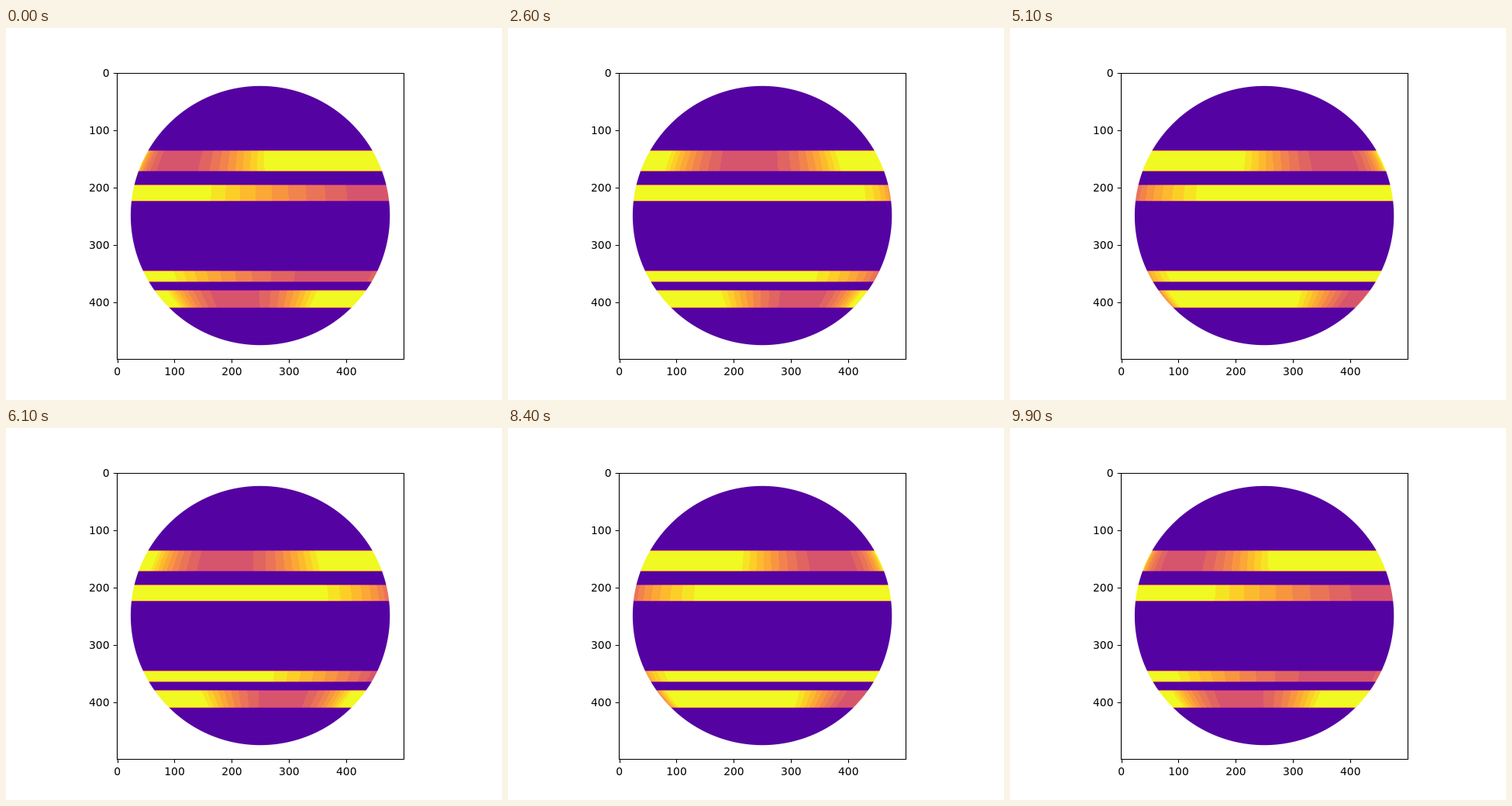
An HTML page with a canvas that plays this animation: 640 by 480 pixels, repeating every 10 s.

```html
<!DOCTYPE html>
<html lang="en">
<head>
<meta charset="utf-8">
<title>Rotating banded planet</title>
<style>
  html, body { margin: 0; width: 640px; height: 480px; overflow: hidden; background: #fff; }
  canvas, svg { position: absolute; left: 0; top: 0; }
  text { font: 13.89px "DejaVu Sans", sans-serif; }
  path { fill: none; stroke: #000; stroke-width: 1.11; }
</style>
</head>
<body>
<canvas width="640" height="480"></canvas>
<svg width="640" height="480"></svg>
<script>
const ORIGIN = { x: 143.2, y: 57.6 }, SCALE = 0.7392;
const DISC = { x: 328.1, y: 242, r: 167.2 };
const BOX = { x: 160, y: 74, size: 337 };
const BASE = 3, LOW = 11, HIGH = 20;   // data values of surface, band minimum, band maximum
const PLASMA = ['0d0887', '46039f', '7201a8', '9c179e', 'bd3786',
                'd8576b', 'ed7953', 'fb9f3a', 'fdca26', 'f0f921']
  .map(h => [0, 2, 4].map(i => parseInt(h.substr(i, 2), 16)));

// top and bottom in data rows, waves per turn, phase
const BANDS = [
  { top: 136, bottom: 172, waves: 2, phase: 1.56 },
  { top: 196, bottom: 224, waves: 1, phase: -1.235 },
  { top: 346, bottom: 365, waves: 1, phase: -0.795 },
  { top: 380, bottom: 410.3, waves: 2, phase: 0.5 }
];

const clamp = (v, lo, hi) => Math.min(hi, Math.max(lo, v));
const toY = row => ORIGIN.y + row * SCALE;

function color(value) {
  const p = clamp(value / HIGH, 0, 1) * 9, i = Math.min(8, Math.floor(p));
  return PLASMA[i].map((c, k) => c + (PLASMA[i + 1][k] - c) * (p - i));
}

function drawAxes() {
  let lines = 'M143.5 58.5H513.5V427.5H143.5Z', labels = '';
  for (let n = 0; n < 500; n += 100) {
    const step = (n + 0.5) * SCALE, x = ORIGIN.x + step, y = ORIGIN.y + step;
    const snap = v => Math.floor(v + 0.5) + 0.5;
    lines += `M${snap(x)} 427.5v4.86M143.5 ${snap(y)}h-4.86`;
    labels += `<text x="${x}" y="448" text-anchor="middle">${n}</text>` +
              `<text x="133.5" y="${Math.round(y + 5.2)}" text-anchor="end">${n}</text>`;
  }
  document.querySelector('svg').innerHTML = `<path d="${lines}"/>` + labels;
}

const ctx = document.querySelector('canvas').getContext('2d');
const image = ctx.createImageData(BOX.size, BOX.size);
const bandPixels = [];

function setPixel(i, value) {
  const [r, g, b] = color(value);
  image.data[i] = r;
  image.data[i + 1] = g;
  image.data[i + 2] = b;
}

// Paint the plain disc once and remember the longitude of each band pixel.
function prepare() {
  for (let row = 0; row < BOX.size; row++) {
    const y = BOX.y + row + 0.5, dy = y - DISC.y;
    const half = Math.sqrt(Math.max(0, DISC.r ** 2 - dy * dy));
    const cover = b => clamp(Math.min(y - toY(b.top), toY(b.bottom) - y) / 1.4 + 0.5, 0, 1);
    const band = BANDS.find(b => cover(b) > 0);
    for (let col = 0; col < BOX.size; col++) {
      const dx = BOX.x + col + 0.5 - DISC.x, i = (row * BOX.size + col) * 4;
      const alpha = clamp(DISC.r - Math.hypot(dx, dy) + 0.5, 0, 1);
      setPixel(i, BASE);
      image.data[i + 3] = alpha * 255;
      if (band && alpha) {
        const angle = band.waves * Math.asin(clamp(dx / half, -1, 1)) + band.phase;
        bandPixels.push({ i, angle, cover: cover(band) });
      }
    }
  }
}

function draw(frame) {
  const turn = 2 * Math.PI * frame / 33;
  for (const { i, angle, cover } of bandPixels) {
    const level = Math.floor(8.5 * (1 - Math.cos(angle + turn)));
    const value = Math.min(HIGH, LOW + level);
    setPixel(i, BASE + (value - BASE) * cover);
  }
  ctx.putImageData(image, BOX.x, BOX.y);
}

let shown = -1;
function tick() {
  const frame = Math.floor(performance.now() / 100) % 100;
  if (frame !== shown) draw(shown = frame);
  requestAnimationFrame(tick);
}

drawAxes();
prepare();
tick();
</script>
</body>
</html>
```
